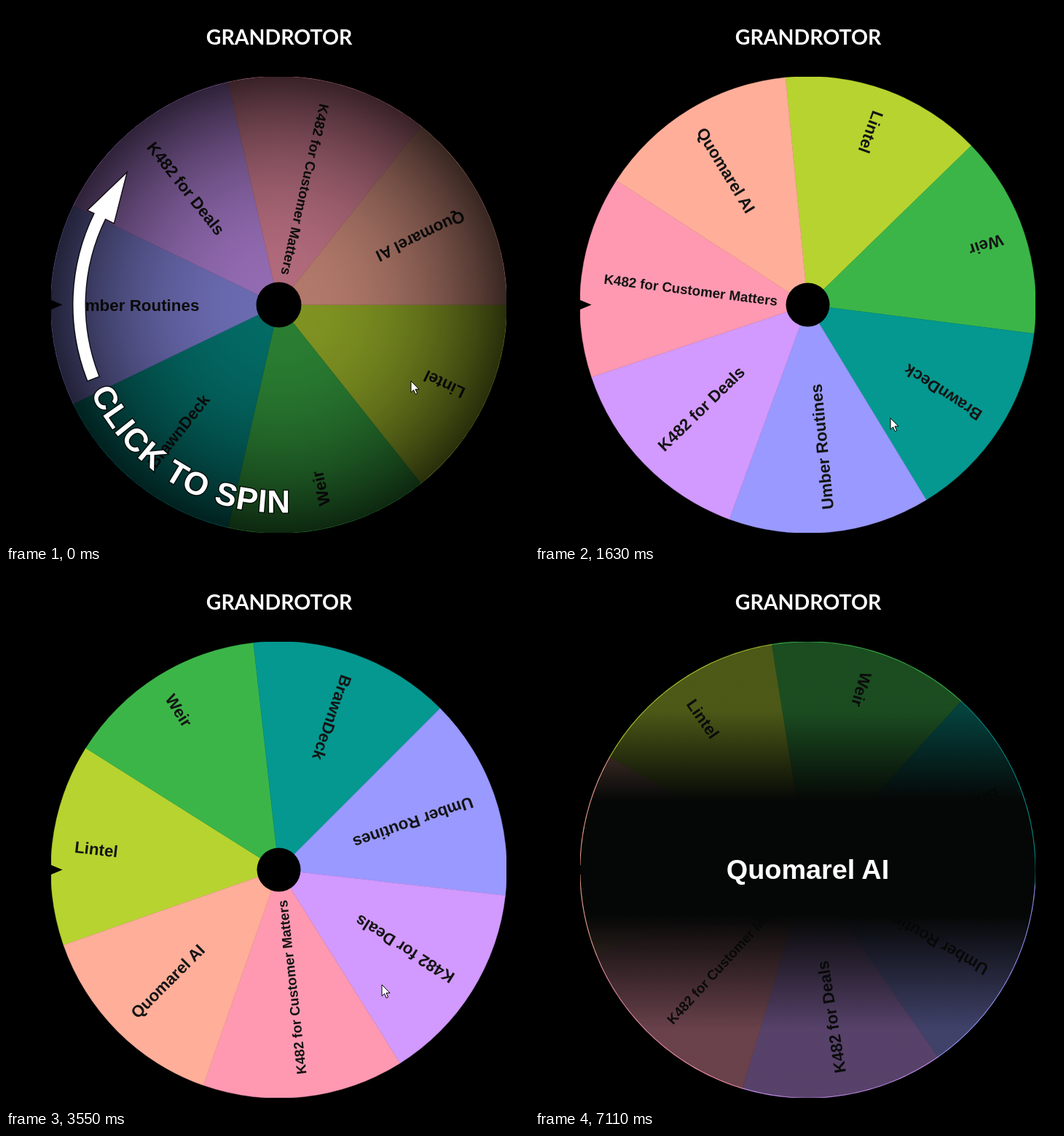
An HTML page for the animation above (7890 ms loop, 718 by 736 pixels).

```html
<!DOCTYPE html>
<html lang="en">
<head>
<meta charset="utf-8">
<title>Spin the wheel</title>
<style>
  html, body { margin: 0; width: 100%; height: 100%; overflow: hidden; background: #000; }
  svg { display: block; width: 718px; height: 736px; }
  text { font-family: "Liberation Sans", Arial, sans-serif; font-weight: 700; }
  .title { font: 700 28.5px Lato, sans-serif; fill: #fff; text-anchor: middle; }
  .label { font-size: 22.4px; fill: #141414; }
  .long { font-size: 18.8px; }
  .prompt { font-size: 44px; letter-spacing: 1.4px; }
  .prompt, #arrow { fill: #fff; stroke: #000; stroke-width: 3px; stroke-opacity: .7; paint-order: stroke; }
  .prize { font-size: 37.8px; fill: #fff; text-anchor: middle; }
  #band stop { stop-color: #050706; }
  .dim { stop-opacity: .6; }
</style>
</head>
<body>
<svg viewBox="0 0 718 736" xmlns="http://www.w3.org/2000/svg">
  <defs>
    <clipPath id="box"><rect x="62" y="97" width="625" height="625"/></clipPath>
    <radialGradient id="vignette"></radialGradient>
    <linearGradient id="band" x2="0" y2="1">
      <stop class="dim" offset=".15"/>
      <stop offset=".35"/>
      <stop offset=".6"/>
      <stop class="dim" offset=".85"/>
    </linearGradient>
    <path id="curve"/>
  </defs>
  <rect width="718" height="736"/>
  <text class="title" x="375" y="53">GRANDROTOR</text>

  <g clip-path="url(#box)">
    <g id="wheel"></g>
    <circle cx="374.5" cy="409.5" r="30"/>
    <path d="M62 403L77.5 409.5L62 416Z"/>
    <g id="start">
      <circle cx="374.5" cy="409.5" r="313" fill="url(#vignette)"/>
      <circle cx="374.5" cy="409.5" r="31"/>
      <path id="arrow"/>
      <text class="prompt"><textPath href="#curve">CLICK TO SPIN</textPath></text>
    </g>
    <g id="result">
      <circle cx="374.5" cy="409.5" r="312.2" fill="url(#band)"/>
      <text class="prize" x="374.5" y="422">Quomarel AI</text>
    </g>
  </g>

  <path id="cursor" d="M0 0V15.5L3.6 12.2L6.2 18.2L8.6 17.1L6 11.3H11Z" fill="#fff" stroke="#000"/>
</svg>

<script>
const LOOP = 7890, STEP = 77, FIRST = 550;
const SPIN_START = 605, SPIN_END = 5641, TURN = 4 * 360 + 209.5;
const CX = 374.5, CY = 409.5, R = 313;

const slices = [
  ['Lintel', '#b7d330'],
  ['Weir', '#3cb548'],
  ['BrawnDeck', '#049890'],
  ['Umber Routines', '#9999ff'],
  ['K482 for Deals', '#d299ff'],
  ['K482 for Customer Matters', '#ff99b2'],
  ['Quomarel AI', '#ffae99']
];
const SLICE = 360 / slices.length;

const $ = id => document.getElementById(id);

function add(parent, tag, attrs, text = '') {
  const el = document.createElementNS('http://www.w3.org/2000/svg', tag);
  for (const name in attrs) el.setAttribute(name, attrs[name]);
  el.textContent = text;
  return parent.appendChild(el);
}

function polar(r, deg) {
  const a = deg * Math.PI / 180;
  return `${CX + r * Math.cos(a)} ${CY + r * Math.sin(a)}`;
}

const arc = (r, deg, sweep) => `A${r} ${r} 0 0 ${sweep} ${polar(r, deg)}`;

// 0 before a, 1 after b
const ramp = (t, a, b) => Math.min(1, Math.max(0, (t - a) / (b - a)));

slices.forEach(([name, fill], i) => {
  const from = i * SLICE;
  add($('wheel'), 'path', {
    d: `M${CX} ${CY}L${polar(R, from)}${arc(R, from + SLICE, 1)}Z`,
    fill, stroke: fill, 'stroke-width': .4
  });
});
slices.forEach(([name], i) => {
  add($('wheel'), 'text', {
    class: name.length > 20 ? 'label long' : 'label', x: -282, dy: '.36em',
    transform: `translate(${CX} ${CY}) rotate(${(i + .5) * SLICE - 180})`
  }, name);
});

// Darkens towards the rim
for (let r = 0; r <= 1; r += .125)
  add($('vignette'), 'stop', { offset: r, 'stop-opacity': .3 + .48 * r ** 2.2 });

$('curve').setAttribute('d', `M${polar(285, 155)}${arc(285, 75, 0)}`);
$('arrow').setAttribute('d',
  `M${polar(282, 158.4)}${arc(282, 206.4, 1)}L${polar(292, 206.4)}L${polar(276, 220.6)}` +
  `L${polar(253, 206.4)}L${polar(266, 206.4)}${arc(266, 158.4, 0)}Z`);

function draw(now) {
  // The picture advances in even steps
  const t = FIRST + STEP * Math.floor((now % LOOP - FIRST + 8) / STEP);

  const left = 1 - ramp(t, SPIN_START, SPIN_END);
  $('wheel').setAttribute('transform', `rotate(${TURN * (1 - left ** 4)} ${CX} ${CY})`);
  $('start').setAttribute('opacity', 1 - ramp(t, 473, 627));
  $('result').setAttribute('opacity', ramp(t, 5555, 5709));

  const away = ramp(t, 550, 1243), back = ramp(t, 1243, 1936), exit = ramp(t, 6864, 7095);
  const x = 556 - 103 * away + 63 * back - 24 * exit;
  const y = 514 + 48 * away + 5 * back + 175 * exit;
  $('cursor').setAttribute('transform', `translate(${x} ${y})`);
  requestAnimationFrame(draw);
}
draw(performance.now());
</script>
</body>
</html>
```
